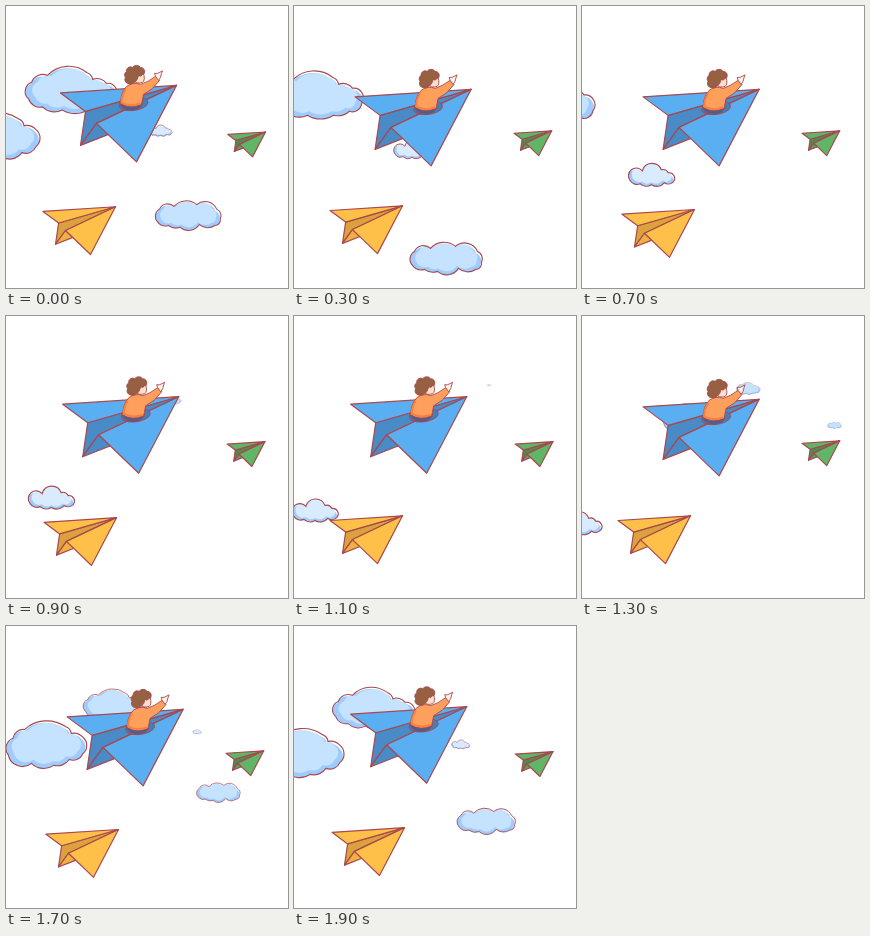
Animation of 282 by 282 pixels, one loop 2000 ms. Source, as an HTML page with a canvas:

```html
<!DOCTYPE html>
<html lang="en">
<head>
<meta charset="utf-8">
<title>Paper planes</title>
<style>
  html, body { margin: 0; width: 100%; height: 100%; overflow: hidden; background: #fff; }
  canvas { display: block; width: 282px; height: 282px; }
</style>
</head>
<body>
<canvas id="stage" width="282" height="282"></canvas>
<script>
const ctx = document.getElementById('stage').getContext('2d');
const LOOP = 2000, STEP = 100, OUTLINE = '#a8484f';

// Outlines are centred on 0,0 at full size. Positions are given for `at` (ms),
// speeds in px per 100 ms; a cloud grows from `born` over `grow` ms.
const clouds = [
  { born: 1055, grow: 960, at: 1300, x: 167, y: 72.5, vx: -14.15, vy: 1.67, light: '#c5e2ff',
    shape: 'M-46 9A10 10 0 0 1-43-8A12 12 0 0 1-27-15A30 30 0 0 1 13-18A9 9 0 0 1 19-11A12 12 0 0 1 33-7A10 10 0 0 1 42 9A9 9 0 0 1 30 16A18 18 0 0 1 14 20A24 24 0 0 1-12 20A17 17 0 0 1-32 17A12 12 0 0 1-46 9Z' },
  { born: 730, grow: 1000, at: 1700, x: 40, y: 118, vx: -16, vy: 4.2, light: '#c5e2ff',
    shape: 'M-39 11A11 11 0 0 1-34-6A11 11 0 0 1-22-15A34 34 0 0 1 20-18A9 9 0 0 1 26-11A13 13 0 0 1 38-7A11 11 0 0 1 38 10A11 11 0 0 1 24 16A15 15 0 0 1 8 22A18 18 0 0 1-15 20A15 15 0 0 1-39 11Z' },
  { born: 1110, grow: 980, at: 2000, x: 182.5, y: 209.5, vx: -10, vy: 14.3, light: '#c5e2ff',
    shape: 'M-34 7A9 9 0 0 1-32-7A10 10 0 0 1-16-10A18 18 0 0 1 9-12A14 14 0 0 1 31-7A8 8 0 0 1 35 4A6 6 0 0 1 29 11A14 14 0 0 1 12 10A14 14 0 0 1-9 13A14 14 0 0 1-22 11A11 11 0 0 1-34 7Z' },
  { born: 1510, grow: 990, at: 2500, x: 94.5, y: 157, vx: -12.1, vy: 6.4, light: '#d8ebff',
    shape: 'M-22 5A7 7 0 0 1-10-5A10 10 0 0 1 9-6A6 6 0 0 1 16-3A5.5 5.5 0 0 1 21 6A7 7 0 0 1 12 7A10 10 0 0 1-1 9A9 9 0 0 1-12 8A8 8 0 0 1-22 5Z' }
].map(c => ({ ...c, path: new Path2D(c.shape) }));

// Straight back and forth between 0 and 1, once per second.
const swing = ms => 1 - Math.abs(1 - ((ms + 2000) % 1000) / 500);

function paint(path, fill, width = 0.9) {
  ctx.fillStyle = fill;
  ctx.strokeStyle = OUTLINE;
  ctx.lineWidth = width;
  ctx.lineJoin = 'round';
  ctx.fill(path);
  ctx.stroke(path);
}

const polygon = (...points) => new Path2D('M' + points.join('L') + 'Z');

function at(x, y, scale, draw) {
  ctx.save();
  ctx.translate(x, y);
  ctx.scale(scale, scale);
  draw();
  ctx.restore();
}

function layer(path, dx, dy, scale, color) {
  at(dx, dy, scale, () => { ctx.fillStyle = color; ctx.fill(path); });
}

function drawCloud(cloud, ms) {
  const time = ms < cloud.born ? ms + LOOP : ms;
  const size = Math.min(1, (time - cloud.born) / cloud.grow);
  const steps = (time - cloud.at) / 100;
  at(cloud.x + cloud.vx * steps, cloud.y + cloud.vy * steps, size, () => {
    ctx.save();
    ctx.clip(cloud.path);
    layer(cloud.path, 0, 0, 1, '#fff');
    layer(cloud.path, -1.2, 2, 1, '#9fccff');
    layer(cloud.path, 0, -1.2, 0.86, cloud.light);
    ctx.restore();
    ctx.strokeStyle = OUTLINE;
    ctx.lineWidth = 1.15;
    ctx.stroke(cloud.path);
  });
}

// The nose is at 0,0.
function drawPlane(x, y, scale, light, mid, dark) {
  const nose = [0, 0], hinge = [-91, 26], tail = [-96, 60], keel = [-80, 38];
  const line = 1.2 / scale;
  at(x, y, scale, () => {
    paint(polygon(nose, hinge, tail, keel), dark, line);
    paint(polygon(tail, keel, [-68, 49]), mid, line);
    paint(polygon(nose, [-116, 7.5], hinge), light, line);
    paint(polygon(nose, keel, [-40, 76.5]), light, line);
  });
}

const boy = [
  ['#427fbd', 'M-57.5 19.5A14.5 6.5-8 0 1-28.5 17.5A14.5 6.5-8 0 1-57.5 19.5Z'],
  ['#4b5f92', 'M-57 17Q-55 25-45 25Q-35 24-34 17Z'],
  ['#ff9f5c', 'M-50 1Q-56 8-56 18Q-47 24-35 19L-33 9Q-24 5-17-5L-21-9Q-29-3-36-1Q-43-4-50 1Z'],
  ['#fff1e6', 'M-21-9L-22-12L-19-12L-14-14.5L-15-12L-16-8L-18-5Z'],
  ['#ffe0cb', 'M-42-11L-33-12Q-31-5-34-3Q-40-1-43-5Z'],
  ['#976042', 'M-49-2A4 4 0 0 1-51-8A4 4 0 0 1-50-14A4 4 0 0 1-44-18A5 5 0 0 1-36-18A4 4 0 0 1-32-13Q-32-11-34-11Q-36-8-38-10Q-39-5-42-3Q-46 0-49-2Z']
].map(([fill, d]) => [fill, new Path2D(d)]);

// Placed relative to the nose of the blue plane.
function drawBoy(x, y) {
  at(x, y, 1, () => {
    boy.forEach(([fill, path]) => paint(path, fill));
    ctx.lineWidth = 2;
    ctx.strokeStyle = '#f9803f';
    ctx.stroke(new Path2D('M-51 4Q-55 11-55 17Q-47 22-36 18'));
  });
}

function draw(ms) {
  ctx.clearRect(0, 0, 282, 282);
  clouds.forEach(cloud => drawCloud(cloud, ms));

  const main = swing(ms), drift = swing(ms - 200);
  const x = 170.5 + 11 * main, y = 79.4 + 6.6 * main;
  drawPlane(259.5 - 3 * main, 126 - 2 * main, 0.325, '#60b567', '#55a25c', '#4b8c50');
  drawPlane(107.5 + 5 * drift, 198.9 + 4.6 * drift, 0.625, '#ffc04a', '#eeb044', '#dba13d');
  drawPlane(x, y, 1, '#5aaff3', '#488bc6', '#488bc6');
  drawBoy(x, y);
}

const start = performance.now();
function tick(now) {
  const elapsed = Math.max(0, now - start + 1);
  draw(Math.floor(elapsed / STEP) * STEP % LOOP);
  requestAnimationFrame(tick);
}
draw(0);
requestAnimationFrame(tick);
</script>
</body>
</html>
```
